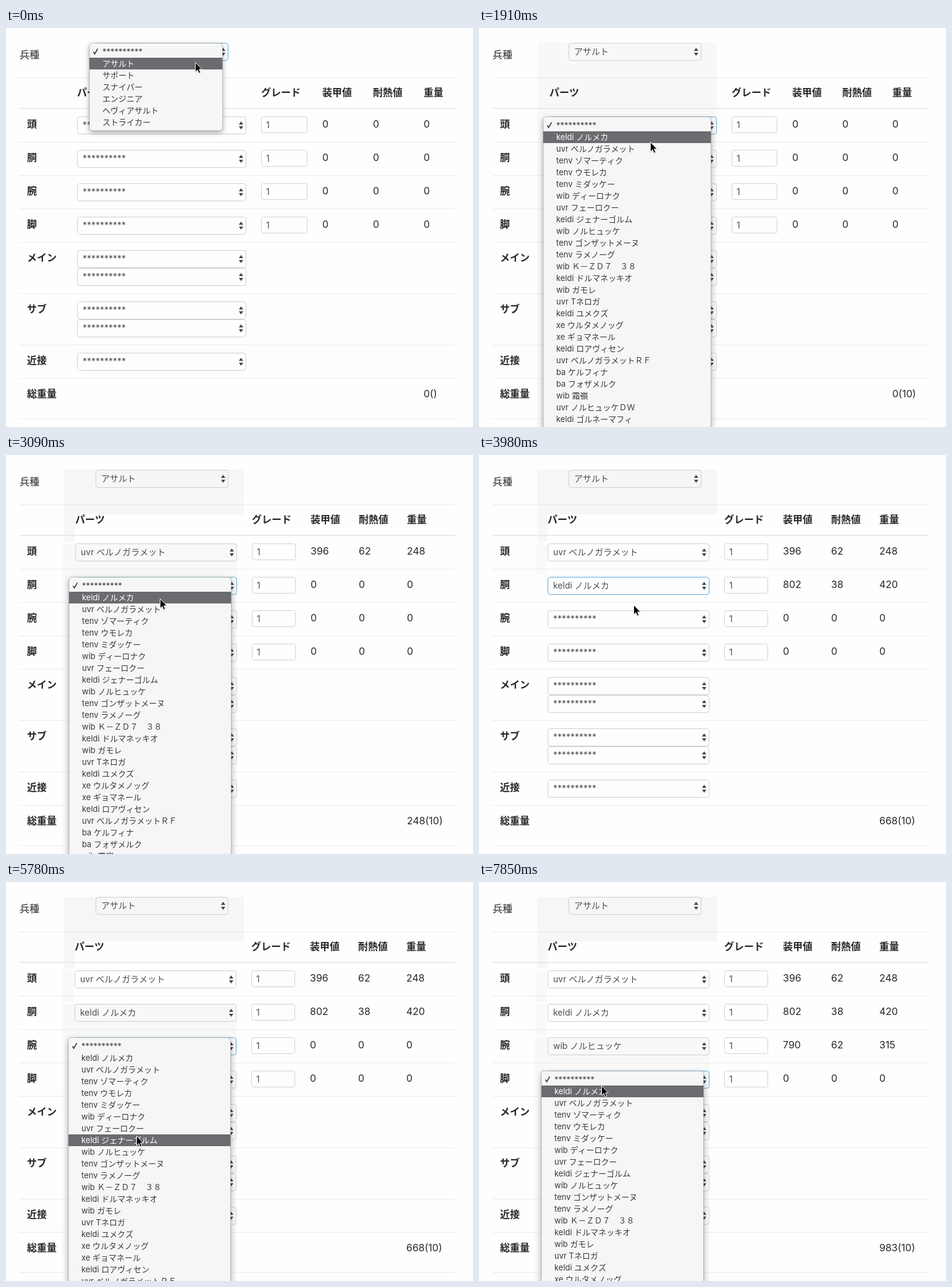
An HTML page with a canvas that plays this animation: 756 by 645 pixels, repeating every 8 s.

```html
<!DOCTYPE html>
<html lang="ja">
<head>
<meta charset="utf-8">
<style>
html, body { margin: 0; width: 100%; height: 100%; overflow: hidden; background: #fefefe; }
canvas { display: block; width: 756px; height: 645px; }
</style>
</head>
<body>
<canvas id="stage" lang="ja"></canvas>
<script>
const W = 756, H = 645, LOOP = 8000, BEAT = 148, LAST = 53;
const FONT = 'Inter, "Noto Sans CJK JP", "Noto Sans CJK", sans-serif';
const INK = '#26282a', FIELD = '#4a4e51', NONE = '**********';
const ROW = 54, SELECT = 29, ITEM = 19;

const canvas = document.getElementById('stage');
const ratio = window.devicePixelRatio || 1;
canvas.width = W * ratio;
canvas.height = H * ratio;
const ctx = canvas.getContext('2d');
ctx.scale(ratio, ratio);

const CLASSES = [NONE, 'アサルト', 'サポート', 'スナイパー', 'エンジニア', 'ヘヴィアサルト', 'ストライカー'];
const PARTS = [
  NONE, 'keldi ノルメカ', 'uvr ベルノガラメット', 'tenv ゾマーティク', 'tenv ウモレカ',
  'tenv ミダッケー', 'wib ディーロナク', 'uvr フェーロクー', 'keldi ジェナーゴルム',
  'wib ノルヒュッケ', 'tenv ゴンザットメーヌ', 'tenv ラメノーグ', 'wib Ｋ－ＺＤ７　３８',
  'keldi ドルマネッキオ', 'wib ガモレ', 'uvr Tネロガ', 'keldi ユメクズ', 'xe ウルタメノッグ',
  'xe ギョマネール', 'keldi ロアヴィセン', 'uvr ベルノガラメットＲＦ', 'ba ケルフィナ',
  'ba フォザメルク', 'wib 霜嶺', 'uvr ノルヒュッケＤＷ', 'keldi ゴルネーマフィ'
];

// Each field opens and closes its menu on a beat; its choice squeezes the columns by `squeeze`.
const UNIT = { y: 24, open: -1, close: 2, pick: 1, squeeze: 7, items: CLASSES };
const SLOTS = [
  { label: '頭', open: 9, close: 17, pick: 2, squeeze: 27, stats: [396, 62, 248] },
  { label: '胴', open: 20, close: 27, pick: 1, squeeze: 28, stats: [802, 38, 420] },
  { label: '腕', open: 31, close: 46, pick: 9, squeeze: 28, stats: [790, 62, 315] },
  { label: '脚', open: 50, close: LAST + 2, pick: 1 }
].map((slot, i) => ({ ...slot, y: 143 + ROW * i, items: PARTS }));
const FIELDS = [UNIT, ...SLOTS];
const WEAPONS = [['メイン', 2], ['サブ', 2], ['近接', 1]];

// Pointer stops: beat, x, y.
const PATH = [
  [0, 306, 55], [2, 306, 57], [8, 276, 158], [13, 277, 184], [14, 277, 198], [16, 277, 198],
  [20, 250, 212], [21, 249, 232], [26, 250, 236], [31, 251, 265], [39, 211, 410],
  [41, 211, 411], [42, 214, 428], [45, 217, 422], [49, 200, 319], [LAST, 198, 329]
];

function pointerAt(beat) {
  const i = Math.max(1, PATH.findIndex(p => p[0] >= beat));
  const [a, b] = [PATH[i - 1], PATH[i]];
  const k = (beat - a[0]) / (b[0] - a[0]);
  return [1, 2].map(n => Math.round(a[n] + (b[n] - a[n]) * k));
}

function columnsAt(beat) {
  const d = FIELDS.filter(f => f.close <= beat).pop()?.squeeze ?? 0;
  const armor = 512 - Math.round(d * 0.7), partEnd = 389 - Math.round(d * 0.57);
  return {
    part: 115 - Math.floor(d / 7), partEnd,
    grade: partEnd + 24, gradeEnd: armor - 24,
    armor, heat: 594 - Math.round(d * 0.85), weight: 676 - d
  };
}

const spanOf = (field, col) => field === UNIT ? [145, 360] : [col.part, col.partEnd];

function text(str, x, y, size = 16, color = INK, weight = 400) {
  ctx.font = `${weight} ${size}px ${FONT}`;
  ctx.fillStyle = color;
  ctx.fillText(str, x, y);
}
const bold = (str, x, y) => text(str, x, y, 16, INK, 700);

function rect(x, y, w, h, color) {
  ctx.fillStyle = color;
  ctx.fillRect(x, y, w, h);
}

function shape(points, color) {
  ctx.beginPath();
  points.forEach(([x, y]) => ctx.lineTo(x, y));
  ctx.closePath();
  ctx.fillStyle = color;
  ctx.fill();
}

function outline(x, end, y, h, r, color) {
  ctx.beginPath();
  ctx.roundRect(x + 0.5, y + 0.5, end - x - 1, h - 1, r);
  ctx.strokeStyle = color;
  ctx.lineWidth = 1;
  ctx.stroke();
}

function select([x, end], y, value, focused) {
  outline(x, end, y, SELECT, 4, focused ? '#5fa9d6' : '#cfcfcf');
  text(value, x + 9, y + 19, 14, FIELD);
  const cx = end - 8.5, cy = y + 14.5;
  for (const s of [-1, 1]) {
    shape([[cx - 3.5, cy + 1.5 * s], [cx + 3.5, cy + 1.5 * s], [cx, cy + 6.5 * s]], '#454545');
  }
}

// An open menu tints its column from the field above; a margin strip stays behind.
function shades(beat, col) {
  const left = col.part - 20;
  if (beat >= SLOTS[0].open) {
    rect(94, UNIT.y, 291, 72, '#f6f6f6');
    rect(94, 96, 17, 44, '#f7f7f7');
  }
  SLOTS.forEach((slot, i) => {
    const top = FIELDS[i].y;
    if (beat < slot.open) return;
    if (beat < slot.close) rect(left, top, col.partEnd - left, H - top, '#f8f8f8');
    else if (i) rect(left, top, 19, 51, '#f9f9f9');
  });
}

function page(beat, col) {
  const focus = FIELDS.filter(f => f.open < beat).pop();
  const valueOf = f => f.items[beat >= f.close ? f.pick : 0];
  const part = [col.part, col.partEnd];
  const rule = y => rect(22, y, 706, 1, '#e9eaeb');

  rect(0, 0, W, H, '#fefefe');
  shades(beat, col);

  text('兵種', 22, 49);
  select(spanOf(UNIT, col), UNIT.y, valueOf(UNIT), focus === UNIT);

  rule(80);
  rule(129);
  const heads = { part: 'パーツ', grade: 'グレード', armor: '装甲値', heat: '耐熱値', weight: '重量' };
  for (const key in heads) bold(heads[key], col[key], 110);

  let total = 0, top = 143;
  const startRow = label => {
    rule(top - 13);
    bold(label, 34, top + 18);
  };
  for (const slot of SLOTS) {
    const stats = beat >= slot.close ? slot.stats : [0, 0, 0];
    startRow(slot.label);
    select(part, top, valueOf(slot), focus === slot);
    outline(col.grade, col.gradeEnd, top, 27, 3, '#d2d2d2');
    text('1', col.grade + 8, top + 19, 14, FIELD);
    ['armor', 'heat', 'weight'].forEach((key, i) => text(stats[i], col[key], top + 18));
    total += stats[2];
    top += ROW;
  }
  for (const [label, count] of WEAPONS) {
    startRow(label);
    for (let i = 0; i < count; i++) select(part, top + SELECT * i, NONE);
    top += 25 + SELECT * count;
  }
  startRow('総重量');
  text(`${total}(${beat < UNIT.close ? '' : 10})`, col.weight, top + 18);
  rule(631);
}

function menu(field, beat, col, pointerY) {
  const { y, items } = field;
  const [left, right] = spanOf(field, col);
  const x = left - 10, w = right - left + 0.5, first = y + 5;
  const closing = beat === field.close - 1;
  const active = closing ? field.pick : Math.max(0, Math.floor((pointerY - first) / ITEM));
  const panel = new Path2D();
  panel.roundRect(x, y + 0.5, w, items.length * ITEM + 8.5, 5);
  const outside = new Path2D(panel);
  outside.rect(0, 0, W, H * 2);

  ctx.save();
  ctx.globalAlpha = closing ? 0.9 : 1;
  ctx.fillStyle = '#f6f6f6';
  ctx.save();
  ctx.clip(outside, 'evenodd');
  ctx.shadowColor = 'rgba(0,0,0,.35)';
  ctx.shadowBlur = 9 * ratio;
  ctx.shadowOffsetY = 3 * ratio;
  ctx.fill(panel);
  ctx.restore();
  ctx.fill(panel);
  ctx.strokeStyle = 'rgba(0,0,0,.3)';
  ctx.lineWidth = 0.7;
  ctx.stroke(panel);

  items.forEach((item, i) => {
    const top = first + i * ITEM, on = i === active;
    if (on) rect(x, top, w, ITEM, '#6c6b70');
    text(item, x + 21, top + 14, 13, on ? '#fff' : '#3a3a3a');
  });
  ctx.beginPath();
  ctx.moveTo(x + 6.5, first + 9.5);
  ctx.lineTo(x + 8.7, first + 13);
  ctx.lineTo(x + 13.5, first + 4.5);
  ctx.strokeStyle = active ? '#3a3a3a' : '#fff';
  ctx.lineWidth = 1.6;
  ctx.stroke();
  ctx.restore();
}

function pointer(x, y) {
  ctx.save();
  ctx.translate(x + 0.5, y + 0.5);
  ctx.shadowColor = 'rgba(0,0,0,.3)';
  ctx.shadowBlur = 2 * ratio;
  ctx.shadowOffsetY = ratio;
  shape([[0, 0], [0, 15.5], [3.5, 12.2], [5.8, 17.6], [8.4, 16.5], [6.1, 11.3], [10.8, 11.3]], '#000');
  ctx.shadowColor = 'transparent';
  ctx.strokeStyle = '#fff';
  ctx.lineWidth = 1;
  ctx.stroke();
  ctx.restore();
}

function draw(now) {
  const beat = Math.min(LAST, Math.floor((now % LOOP + 25) / BEAT));
  const [x, y] = pointerAt(beat);
  const col = columnsAt(beat);
  page(beat, col);
  const open = FIELDS.find(f => beat >= f.open && beat < f.close);
  if (open) menu(open, beat, col, y);
  pointer(x, y);
}

let origin;
function tick(now) {
  origin ??= now;
  draw(Math.max(0, now - origin));
  requestAnimationFrame(tick);
}
draw(0);
requestAnimationFrame(tick);
</script>
</body>
</html>
```
